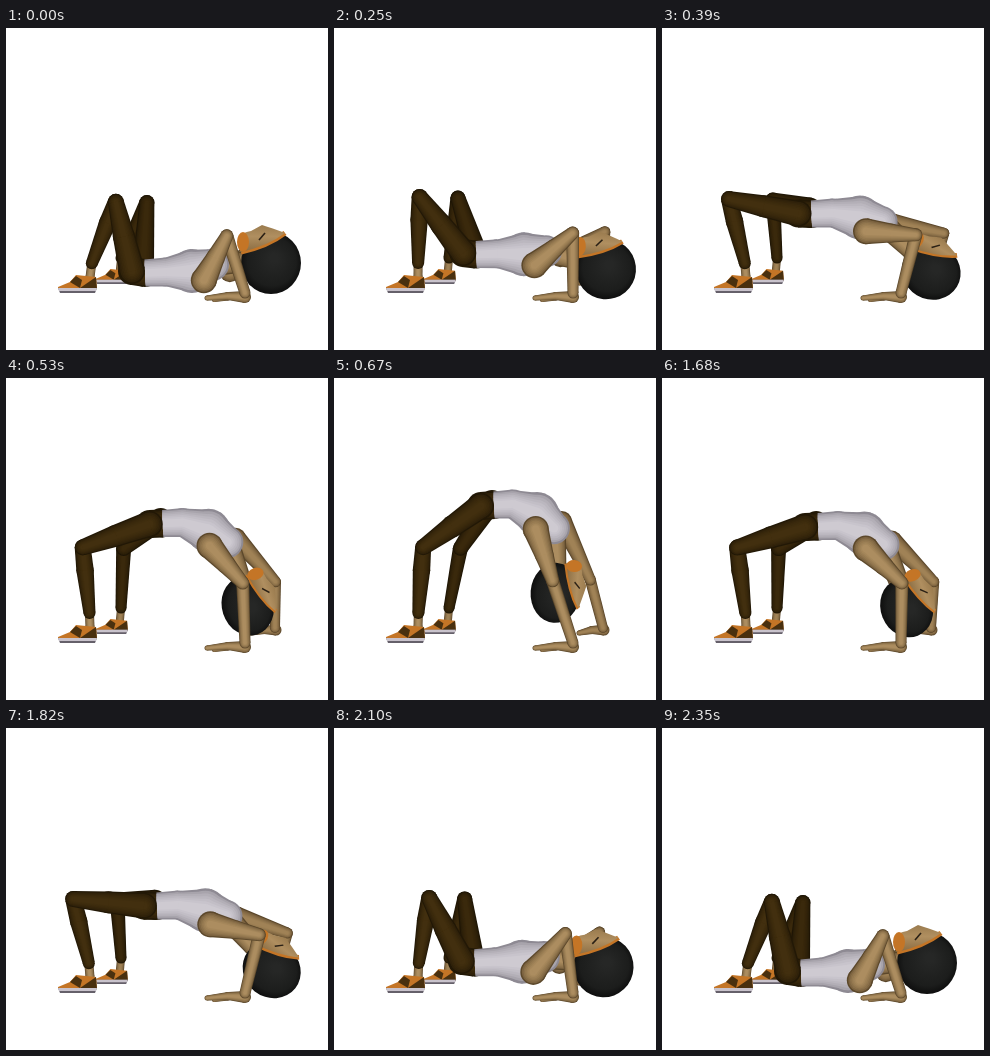
An HTML page with a canvas for the animation above (2.6 s loop, 322 px wide and 322 px high).

```html
<!DOCTYPE html>
<html lang="en">
<head>
<meta charset="utf-8">
<title>Back bridge</title>
<style>
html, body { margin: 0; width: 100%; height: 100%; overflow: hidden; background: #fff; }
canvas { display: block; }
</style>
</head>
<body>
<canvas id="stage" width="322" height="322"></canvas>
<script>
const ctx = document.getElementById('stage').getContext('2d');

// Tones from the shaded rim to the lit middle
const SKIN = [[92, 72, 43], [172, 141, 96]];
const FAR_SKIN = [[88, 68, 40], [160, 130, 86]];
const TROUSERS = [[34, 24, 6], [66, 47, 15]];
const FAR_TROUSERS = [[30, 21, 5], [58, 41, 12]];
const SHIRT = [[142, 138, 147], [206, 202, 209]];
const ORANGE = '#c47526';
const BROWN = '#49300f';

// Fraction of the lift, held between steps as the figure rises and sinks
function liftAt(t) {
  if (t < 150) return 0;
  if (t < 1540) return (t < 250 ? 1 : Math.min(8, 2 + Math.floor((t - 250) / 70))) / 8;
  if (t < 2100) return (10 - Math.floor((t - 1540) / 70)) / 11;
  return t < 2200 ? 2 / 11 : t < 2350 ? 1 / 11 : 0;
}

const between = (a, b, f) => [a[0] + (b[0] - a[0]) * f, a[1] + (b[1] - a[1]) * f];

function offset([x, y], length, degrees) {
  const angle = degrees * Math.PI / 180;
  return [x + length * Math.cos(angle), y + length * Math.sin(angle)];
}

// Knee or elbow of a two-bone limb, bent to the left of a -> b
function bend(a, b, first, second) {
  const dx = b[0] - a[0], dy = b[1] - a[1];
  const d = Math.hypot(dx, dy);
  if (d >= first + second) return between(a, b, first / (first + second));
  const along = (d * d + first * first - second * second) / (2 * d);
  const out = Math.sqrt(first * first - along * along);
  return [a[0] + (dx * along + dy * out) / d, a[1] + (dy * along - dx * out) / d];
}

// Rounded, shaded tube through [x, y, radius] points
function tube(tone, points, flatStart) {
  const layers = 7;
  for (let n = 0; n < layers; n++) {
    const f = n / (layers - 1);
    const light = Math.sqrt(f);
    const size = 1 - f * 0.72;
    ctx.fillStyle = `rgb(${tone[0].map((c, k) => c + (tone[1][k] - c) * light)})`;
    points.forEach(([x, y, r], i) => {
      if (i || !flatStart) {
        ctx.beginPath();
        ctx.arc(x, y, r * size, 0, 7);
        ctx.fill();
      }
      if (!i) return;
      const [px, py, pr] = points[i - 1];
      const len = Math.hypot(x - px, y - py) || 1;
      const nx = (py - y) / len * size, ny = (x - px) / len * size;
      polygon([[px + nx * pr, py + ny * pr], [x + nx * r, y + ny * r],
        [x - nx * r, y - ny * r], [px - nx * pr, py - ny * pr]]);
    });
  }
}

function polygon(points, fill) {
  if (fill) ctx.fillStyle = fill;
  ctx.beginPath();
  points.forEach(p => ctx.lineTo(...p));
  ctx.fill();
}

function ellipse(x, y, rx, ry, fill) {
  ctx.fillStyle = fill;
  ctx.beginPath();
  ctx.ellipse(x, y, rx, ry, 0, 0, 7);
  ctx.fill();
}

function shoe(x, y, scale) {
  ctx.save();
  ctx.translate(x, y);
  ctx.scale(scale, scale);
  polygon([[0, -6], [12, -11], [18, -18], [38, -16], [39, -4], [0, -4]], ORANGE);
  polygon([[12, -11], [18, -17], [24, -13], [22, -5]], BROWN);
  polygon([[22, -5], [38, -16], [39, -4]], BROWN);
  polygon([[0, -5], [39, -5], [37, 0], [2, 0]], '#65606a');
  polygon([[0, -5], [39, -5], [38, -2], [1, -2]], '#c9c3cc');
  ctx.restore();
}

// Drawn lying down: crown to the right, face up
function head([x, y], degrees, squash) {
  ctx.save();
  ctx.translate(x, y);
  ctx.rotate(degrees * Math.PI / 180);
  ctx.scale(1, squash);
  const hair = ctx.createRadialGradient(6, -2, 4, 3, 3, 33);
  hair.addColorStop(0, '#262726');
  hair.addColorStop(0.7, '#1c1d1c');
  hair.addColorStop(1, '#0a0a0a');
  ellipse(3, 3, 30, 31, hair);

  const skin = ctx.createLinearGradient(0, -34, 0, -8);
  skin.addColorStop(0, '#9c7d50');
  skin.addColorStop(0.4, '#b08f60');
  skin.addColorStop(1, '#8a6c42');
  ctx.fillStyle = skin;
  ctx.strokeStyle = ORANGE;
  ctx.lineWidth = 5;
  ctx.beginPath();
  ctx.moveTo(17, -27);
  ctx.quadraticCurveTo(0, -14, -27, -8);
  ctx.stroke();
  ctx.quadraticCurveTo(-36, -26, -17, -29);
  ctx.lineTo(-6, -35);
  ctx.quadraticCurveTo(4, -32, 17, -27);
  ctx.fill();
  ellipse(-25, -18, 6, 10, ORANGE);

  ctx.strokeStyle = '#2a2015';
  ctx.lineWidth = 1.6;
  ctx.beginPath();
  ctx.moveTo(-9, -20);
  ctx.lineTo(-3, -27);
  ctx.stroke();
  ctx.restore();
}

function draw(t) {
  const lift = liftAt(t);
  const h = lift * lift * (3 - 2 * lift);
  const tilt = -17 + 57 * h;

  const hip = [126 + 21 * h, 243 - 115 * h];
  const chest = [186 + 17 * Math.sin(h * Math.PI / 2), 243 - 107 * h];
  const skull = [262 + 62 * h - 100 * h * h, 232 + 50 * h - 70 * h * h];
  const collar = offset(chest, 22, tilt);
  const shoulder = offset(chest, 15, tilt + 55);
  const farShoulder = [shoulder[0] + 26, shoulder[1] - 8];
  const waist = [hip[0] + 13, hip[1] + 2 - 3 * h];
  const belly = between(waist, chest, 0.45);
  belly[1] -= 5 * h;

  const ankle = [84, 240], wrist = [239, 265];
  const knee = bend(ankle, hip, 71, 71);
  const elbow = bend(shoulder, wrist, 50, 60);
  const cuff = between(knee, ankle, 0.93);
  const farKnee = [knee[0] * 0.7 + 64, knee[1] * 0.9 + 18];
  const farElbow = [elbow[0] * 0.72 + 99, elbow[1] * 0.75 + 50];

  ctx.fillStyle = '#fff';
  ctx.fillRect(0, 0, 322, 322);

  tube(FAR_SKIN, [[115, 230, 4], [114, 242, 4]]);
  shoe(89.5, 256, 0.83);
  tube(FAR_TROUSERS, [[...farKnee, 7.5], [115, 230, 5.5]]);
  tube(FAR_TROUSERS, [[hip[0] + 11, hip[1] - 5, 11], [...farKnee, 7.5]]);

  tube(FAR_SKIN, [[245, 255, 2.5], [258, 252, 4], [270, 252, 5.5]]);
  tube(FAR_SKIN, [[...farElbow, 5.5], [269, 250, 5]]);
  tube(FAR_SKIN, [[...farShoulder, 10], [...farElbow, 5.5]]);
  tube(SKIN, [[...collar, 12], [...between(collar, skull, 0.6), 10]]);

  tube(SKIN, [[...cuff, 4.5], [84, 249, 4.5]]);
  shoe(52, 265, 1);
  tube(TROUSERS, [[...hip, 14], [...waist, 14]]);
  tube(SHIRT, [[...waist, 13.5], [...belly, 14.5], [...chest, 22], [...collar, 16]], true);
  tube(TROUSERS, [[...knee, 8], [...between(knee, cuff, 0.35), 8.7], [...cuff, 6]]);
  tube(TROUSERS, [[...hip, 13], [...between(hip, knee, 0.5), 11], [...knee, 8]]);

  head(skull, 94 * h ** 1.6, 1 - 0.2 * h);

  tube(SKIN, [[208, 272, 2], [222, 269, 3.5]]);
  tube(SKIN, [[201, 270, 2.5], [222, 268, 4], [239, 269, 6]]);
  tube(SKIN, [[...elbow, 6.5], [...wrist, 5.5]]);
  tube(SKIN, [[...shoulder, 13], [...between(shoulder, elbow, 0.5), 9.5], [...elbow, 6.5]]);
}

function tick() {
  draw(performance.now() % 2600);
  requestAnimationFrame(tick);
}
tick();
</script>
</body>
</html>
```
